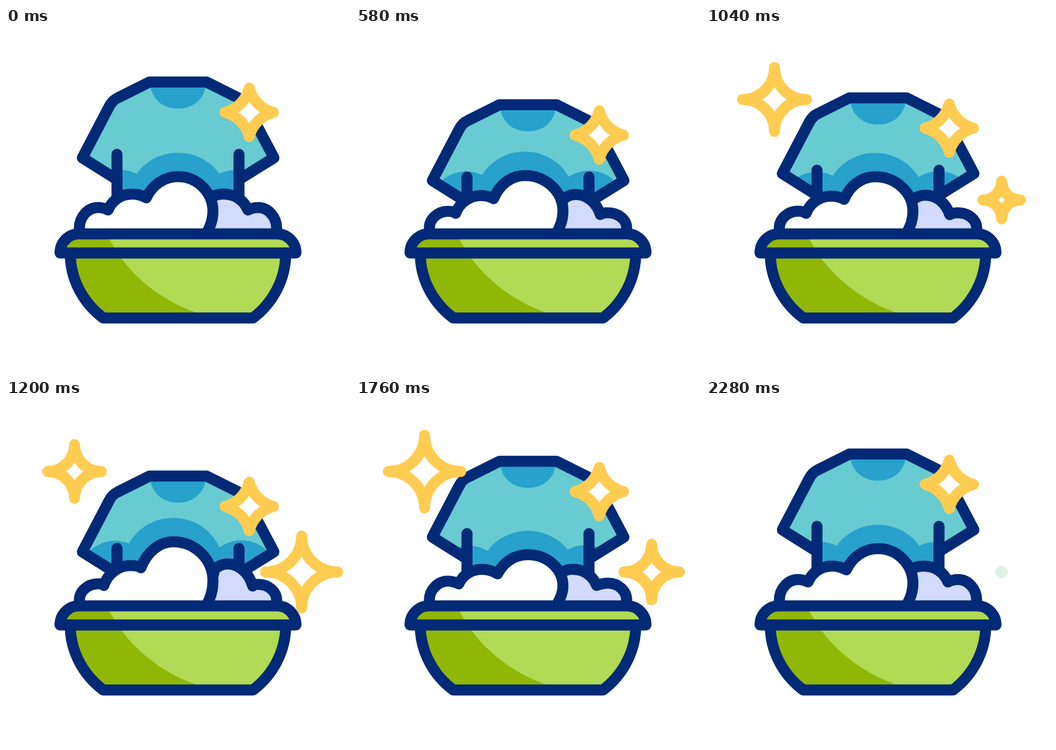
These frames come from a looping animation (640x640 px, 2.4 s). An HTML page with a canvas:

```html
<!DOCTYPE html>
<html lang="en">
<head>
<meta charset="utf-8">
<title>Laundry</title>
<style>
  html, body { margin: 0; width: 100%; height: 100%; overflow: hidden; background: #fff; }
  canvas { display: block; }
</style>
</head>
<body>
<canvas id="stage" width="640" height="640"></canvas>
<script>
const ctx = document.getElementById('stage').getContext('2d');
const NAVY = '#032a76', TEAL = '#67cbd1', BLUE = '#28a1cd', LAVENDER = '#d2dbfd';
const LIME = '#b1da55', OLIVE = '#91b706', YELLOW = '#ffcc52', WHITE = '#fff';
const LOOP = 2400, LAST = 2280, STEP = 20;

// Foam poses: rest, swollen, sunk. The right side is stored mirrored.
// lobes: outer peak y, outer notch, inner peak, inner notch
// dome: peak, y of its right edge; shade: peak of the side shadow
const rest = {
  left: [334, 190, 338.5, 235, 309, 261, 316], right: [334, 190, 338.5, 235, 309, 261, 316],
  dome: [320, 276.5, 341], shadeL: [212, 264], shadeR: [212, 264]
};
const swollen = {
  left: [342, 182, 345, 231, 308, 251, 312], right: [343, 181, 346, 228, 305, 252, 316],
  dome: [311, 263.5, 336], shadeL: [203, 262], shadeR: [202, 261]
};
const sunk = {
  left: [339, 192, 344.5, 235, 319, 265, 328], right: [345, 194, 349, 238, 319, 261, 327],
  dome: [320, 295, 349], shadeL: [209, 276], shadeR: [214, 274]
};

const foamKeys = [[0, rest], [420, swollen], [820, sunk], [1220, swollen], [1580, sunk], [2000, rest]];
const shirtKeys = [[0, 0], [500, 44], [910, 24.5], [1300, 44], [2034, 0]];
const leftStarKeys = [[600, 0], [830, 67.5], [1310, 47.5], [1780, 67.5], [2010, 0]];
const rightStarKeys = [[920, 0], [1155, 67.5], [1655, 47.5], [2000, 67.5], [2312, 0]];

const ease = p => (1 - Math.cos(Math.PI * p)) / 2;
const lerp = (a, b, p) => a + (b - a) * p;

// Returns the surrounding key values and the eased progress between them.
function segment(keys, t) {
  const i = keys.findIndex(k => k[0] > t);
  if (i < 0) return [keys.at(-1)[1], keys.at(-1)[1], 0];
  if (i === 0) return [keys[0][1], keys[0][1], 0];
  const [[t0, a], [t1, b]] = [keys[i - 1], keys[i]];
  return [a, b, ease((t - t0) / (t1 - t0))];
}
const valueAt = (keys, t) => lerp(...segment(keys, t));

function poseAt(t) {
  const [a, b, p] = segment(foamKeys, t);
  return Object.fromEntries(Object.keys(a).map(k => [k, a[k].map((v, i) => lerp(v, b[k][i], p))]));
}

function paint(path, fill, stroke) {
  if (fill) { ctx.fillStyle = fill; ctx.fill(path); }
  if (stroke) { ctx.strokeStyle = stroke; ctx.stroke(path); }
}

const sleeves = 'M206.5 282L142 241.5L192 146Q198 134.5 208 130L267 100.5H373L432 130Q442 134.5 448 146L498.5 241.5L433.5 282';
const shirtFill = new Path2D(sleeves + 'V350H206.5Z');
const shirtLines = new Path2D(sleeves + 'M206.5 235V350M433.5 235V350');
const collar = new Path2D('M267 100C270 133 292 150 320 150S370 133 373 100Z');
const tub = new Path2D('M119.5 418.5C119.5 467 143 511 181 539.5H459.5C497 511 520.5 467 520.5 418.5Z');
const rim = new Path2D('M100.5 418.5H539.5C539.5 399 524 383 504 383H136C116 383 100.5 399 100.5 418.5Z');
const tubShade = new Path2D('M187 380C211 440 275 505 362 532V560H80V380Z');

function star(x, y, size, arc, color = YELLOW) {
  const a = `A${arc} ${arc} 0 0 0 `;
  ctx.save();
  ctx.translate(x, y);
  paint(new Path2D(`M0 ${-size}${a}${size} 0${a}0 ${size}${a}${-size} 0${a}0 ${-size}Z`), WHITE, color);
  ctx.restore();
}

function sparkle(x, y, size) {
  if (size > 0.3) star(x, y, size, size, size < 3 ? '#e1f2e4' : YELLOW);
}

function lobes([y, nx, ny, mx, my, ix, iy]) {
  return `M136.5 383V372C136.5 ${(y + 370) / 2} 152 ${y} 171 ${y}Q181 ${y} ${nx} ${ny}` +
    `C${nx + 7} ${lerp(ny, my, 0.6)} ${mx - 21} ${my} ${mx} ${my}Q${mx + 14} ${my} ${ix} ${iy}`;
}

function dome([x, y, edgeY], ix, iy) {
  return `C${ix + 11} ${lerp(iy, y, 0.6)} ${x - 26} ${y} ${x} ${y}` +
    `C${lerp(x, 385, 0.55)} ${y} 385 ${lerp(edgeY, y, 0.55)} 385 ${edgeY}Q385 363 372 383`;
}

function ellipse(x, top, rx, ry) {
  ctx.beginPath();
  ctx.ellipse(x, top + ry, rx, ry, 0, 0, 2 * Math.PI);
  ctx.fill();
}

function drawShirt(drop, pose) {
  ctx.save();
  ctx.translate(0, drop);
  paint(shirtFill, TEAL);
  paint(collar, BLUE);
  ctx.save();
  ctx.clip(shirtFill);
  ctx.translate(0, -drop);
  ctx.fillStyle = BLUE;
  ellipse(pose.dome[0], pose.dome[1] - 44.5, 93, 90);
  ellipse(pose.shadeL[0], pose.shadeL[1], 60, 50);
  ellipse(640 - pose.shadeR[0], pose.shadeR[1], 60, 50);
  ctx.fillRect(190, 322, 260, 80);
  ctx.restore();
  paint(shirtLines, null, NAVY);
  star(452.5, 157, 45, 62);
  ctx.restore();
}

function drawFoam(pose) {
  ctx.save();
  ctx.translate(640, 0);
  ctx.scale(-1, 1);
  paint(new Path2D(lobes(pose.right) + 'L268 383'), LAVENDER, NAVY);
  ctx.restore();
  const [ix, iy] = pose.left.slice(5);
  paint(new Path2D(lobes(pose.left) + dome(pose.dome, ix, iy)), WHITE, NAVY);
}

function drawBasin() {
  for (const part of [tub, rim]) {
    paint(part, LIME);
    ctx.save();
    ctx.clip(part);
    paint(tubShade, OLIVE);
    ctx.restore();
    paint(part, null, NAVY);
  }
}

function draw(now) {
  const t = Math.min(LAST, Math.floor(now % LOOP / STEP) * STEP);
  const pose = poseAt(t);
  ctx.fillStyle = WHITE;
  ctx.fillRect(0, 0, 640, 640);
  ctx.lineWidth = 20.5;
  ctx.lineCap = ctx.lineJoin = 'round';
  drawShirt(valueAt(shirtKeys, t), pose);
  drawFoam(pose);
  drawBasin();
  sparkle(127.5, 133, valueAt(leftStarKeys, t));
  sparkle(550, 320, valueAt(rightStarKeys, t));
}

const start = performance.now();
function tick() {
  draw(performance.now() - start);
  requestAnimationFrame(tick);
}
tick();
</script>
</body>
</html>
```
